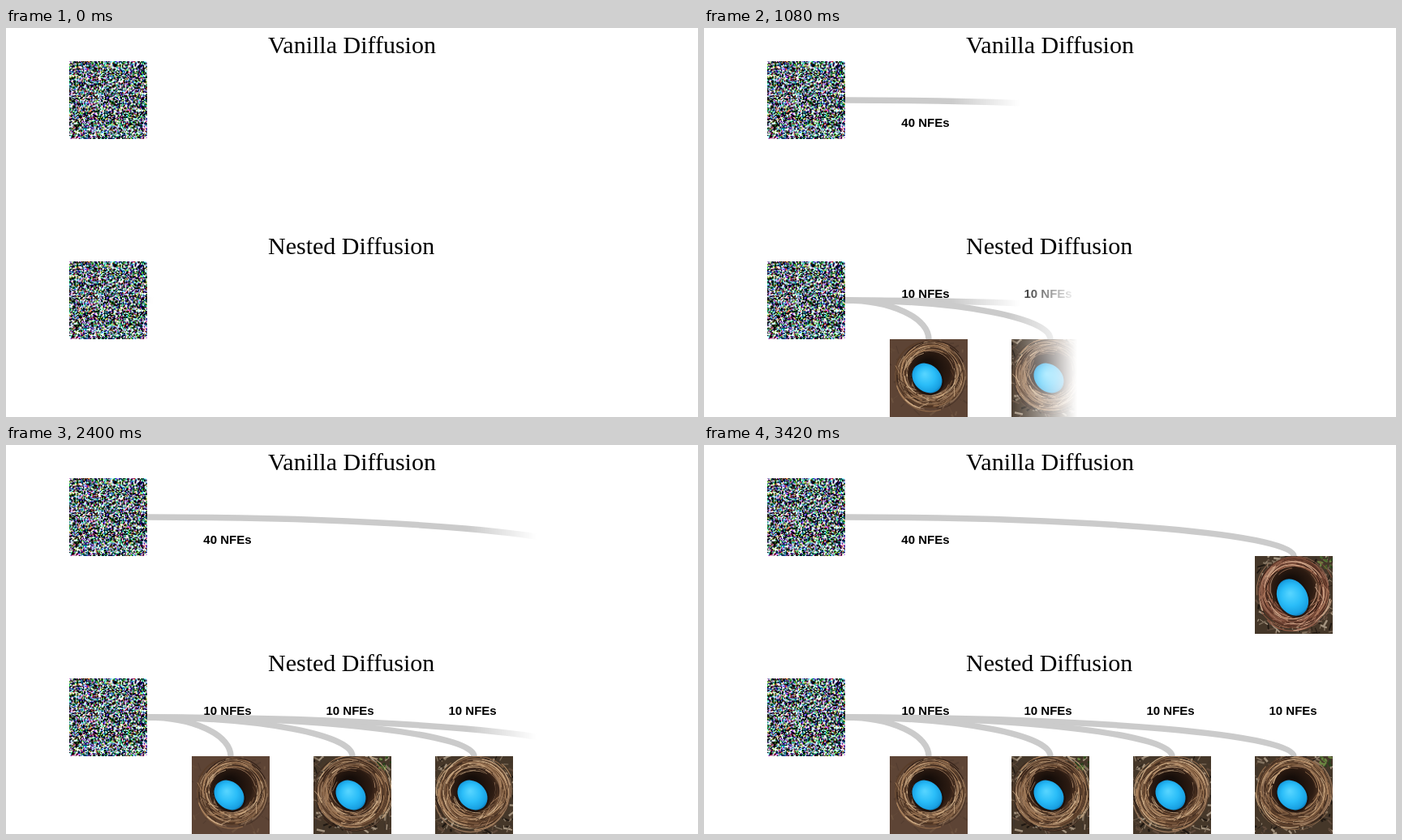
Write an HTML page with a canvas that moves like this. It is 853 by 480 pixels and loops after 7770 ms.

```html
<!DOCTYPE html>
<html lang="en">
<head>
<meta charset="utf-8">
<title>Vanilla and Nested Diffusion</title>
<style>
  @property --t {
    syntax: "<number>";
    inherits: true;
    initial-value: 0;
  }
  html, body {
    margin: 0;
    width: 100%;
    height: 100%;
    overflow: hidden;
    background: #fff;
  }
  /* --t is the elapsed time in ms, advancing every 60 ms */
  #stage {
    position: relative;
    width: 853px;
    height: 480px;
    overflow: hidden;
    animation: clock 7770ms -1ms infinite;
  }
  @keyframes clock {
    0% { --t: 0; animation-timing-function: steps(57, end); }
    44.0154%, 100% { --t: 3420; }
  }
  .layer, svg {
    position: absolute;
    left: 0;
    top: 0;
    width: 853px;
    height: 480px;
  }
  canvas { position: absolute; width: 96px; height: 96px; }
  /* soft left-to-right wipe from x = 174: --begin in ms, --speed in px per ms */
  .wipe {
    --edge: calc((174 + (var(--t) - var(--begin)) * var(--speed)) * 1px);
    --fade: linear-gradient(to right, #000 calc(var(--edge) - 85px), transparent var(--edge));
    -webkit-mask-image: var(--fade);
    mask-image: var(--fade);
  }
  path { fill: none; stroke: #cbcbcb; stroke-width: 7.4; }
  .title { font: 30px "Liberation Serif", "Times New Roman", serif; }
  .label { font: bold 15px "Liberation Sans", Arial, sans-serif; }
</style>
</head>
<body>
<div id="stage">
  <div class="layer" id="base">
    <svg>
      <text class="title" x="323" y="31">Vanilla Diffusion</text>
      <text class="title" x="323" y="279">Nested Diffusion</text>
    </svg>
  </div>
</div>
<script>
  const stage = document.getElementById("stage");
  const base = document.getElementById("base");

  function random(seed) {
    return () => {
      seed = (seed + 0x6d2b79f5) | 0;
      let r = Math.imul(seed ^ (seed >>> 15), 1 | seed);
      r = (r + Math.imul(r ^ (r >>> 7), 61 | r)) ^ r;
      return ((r ^ (r >>> 14)) >>> 0) / 4294967296;
    };
  }

  function addCanvas(parent, x, y) {
    const c = document.createElement("canvas");
    c.width = c.height = 96;
    c.style.left = x + "px";
    c.style.top = y + "px";
    parent.append(c);
    return c.getContext("2d");
  }

  function addLayer(begin, speed, svg) {
    const d = document.createElement("div");
    d.className = "layer wipe";
    d.style.setProperty("--begin", begin);
    d.style.setProperty("--speed", speed);
    d.innerHTML = `<svg>${svg}</svg>`;
    stage.append(d);
    return d;
  }

  const label = (x, y, text) => `<text class="label" x="${x}" y="${y}">${text}</text>`;

  // Quarter ellipse from the noise square down to the top of a result
  const curve = (y, endX) => `<path d="M174 ${y}A${endX - 174} 48 0 0 1 ${endX} ${y + 48}"/>`;

  function drawNoise(ctx, seed) {
    const rnd = random(seed), n = 74;
    const small = document.createElement("canvas");
    small.width = small.height = n;
    const sctx = small.getContext("2d");
    const img = sctx.createImageData(n, n);
    const bell = () => rnd() + rnd() + rnd() - 1.5;
    for (let i = 0; i < img.data.length; i += 4) {
      const common = bell() * 150;
      img.data[i] = 110 + common + bell() * 75;
      img.data[i + 1] = 121 + common + bell() * 75;
      img.data[i + 2] = 125 + common + bell() * 75;
      img.data[i + 3] = 255;
    }
    sctx.putImageData(img, 0, 0);
    ctx.filter = "contrast(1.7)";
    ctx.drawImage(small, 0, 0, 96, 96);
  }

  function oval(ctx, x, y, rx, ry, turn = 0) {
    ctx.beginPath();
    ctx.ellipse(x, y, rx, ry, turn, 0, 2 * Math.PI);
  }

  function drawNest(ctx, o) {
    const rnd = random(o.seed);
    const spread = s => (rnd() - 0.5) * 2 * s;
    const pick = list => list[Math.floor(rnd() * list.length)];
    ctx.fillStyle = o.ground;
    ctx.fillRect(0, 0, 96, 96);

    // Leaf litter
    for (let i = 0; i < o.litter; i++) {
      const x = rnd() * 96, y = rnd() * 96, a = rnd() * 6.3, l = 3 + rnd() * 8;
      ctx.strokeStyle = pick(o.litterTones);
      ctx.lineWidth = 0.7 + rnd() * 2;
      ctx.beginPath();
      ctx.moveTo(x, y);
      ctx.lineTo(x + l * Math.cos(a), y + l * Math.sin(a));
      ctx.stroke();
    }
    if (o.green) {
      for (let i = 0; i < 16; i++) {
        ctx.fillStyle = pick(["#47652b", "#6b8442", "#2c401e"]);
        oval(ctx, 80 + rnd() * 16, rnd() * 15, 1 + rnd() * 3, 1.3, rnd() * 3);
        ctx.fill();
      }
    }

    // Bowl, dark hollow and woven rim
    ctx.fillStyle = o.tones[2];
    oval(ctx, o.x, 45, o.r - 2, o.r - 3);
    ctx.fill();
    const hollow = ctx.createRadialGradient(o.x - 4, 34, 8, o.x, 42, 34);
    hollow.addColorStop(0, "#150d09");
    hollow.addColorStop(0.65, "#2c1b12");
    hollow.addColorStop(1, "#5a3c28");
    ctx.fillStyle = hollow;
    oval(ctx, o.x, 42, 33, 30);
    ctx.fill();
    for (let i = 0; i < 150; i++) {
      const k = rnd(), r = 30 + k * (o.r - 29), from = rnd() * 6.3;
      ctx.strokeStyle = pick(o.tones);
      ctx.lineWidth = 0.5 + rnd() * 0.9;
      ctx.beginPath();
      ctx.ellipse(o.x + spread(o.loose), 42 + k * 3 + spread(o.loose), r, r * (0.88 + rnd() * 0.14),
        spread(0.9), from, from + 0.4 + rnd() * 1.2);
      ctx.stroke();
    }
    for (let i = 0; i < 40; i++) {
      const a = -0.3 + rnd() * 3.7, r = 25 + rnd() * 15, turn = a + 1 + rnd() * 1.3;
      const x = o.x + r * Math.cos(a), y = 44 + r * Math.sin(a);
      ctx.strokeStyle = pick(o.tones);
      ctx.lineWidth = 0.8;
      ctx.beginPath();
      ctx.moveTo(x, y);
      ctx.lineTo(x + 13 * Math.cos(turn), y + 13 * Math.sin(turn));
      ctx.stroke();
    }

    // Egg
    const [ex, ey, rx, ry, tilt] = o.egg;
    ctx.fillStyle = "#1a100acc";
    oval(ctx, ex + 0.5, ey + 1, rx + 2, ry + 1.5, tilt);
    ctx.fill();
    const shell = ctx.createRadialGradient(ex - 3, ey - 5, 1, ex, ey, ry + 1);
    shell.addColorStop(0, "#55d4ff");
    shell.addColorStop(0.5, "#2abdf8");
    shell.addColorStop(0.85, "#18a0e2");
    shell.addColorStop(1, "#0c70aa");
    ctx.fillStyle = shell;
    oval(ctx, ex, ey, rx, ry, tilt);
    ctx.fill();
  }

  const straw = ["#8a6547", "#ad8560", "#5a3e2a", "#cfae88", "#37241a", "#96755a"];
  const rust = ["#8a5540", "#b07d60", "#5a3426", "#d3a98c", "#321c14", "#976652"];
  const litterTones = ["#1f1812", "#82725f", "#40352b", "#a3937f", "#5f4a3b"];
  const plain = {
    ground: "#5d4435", litter: 90, litterTones: ["#624938", "#533d30", "#6c523f"],
    tones: straw, x: 50.5, r: 43, loose: 2, egg: [46, 48, 16.5, 20.3, -0.8]
  };
  const busy = { ...plain, ground: "#453729", litter: 260, litterTones, x: 48.5, r: 46, loose: 4 };

  drawNoise(addCanvas(base, 78, 41), 11);
  drawNoise(addCanvas(base, 78, 288), 11);

  const vanilla = addLayer(0, 0.2, label(243.3, 122, "40 NFEs") + curve(89, 727));
  drawNest(addCanvas(vanilla, 679, 137),
    { ...busy, seed: 9, tones: rust, green: true, x: 48, egg: [46.5, 51, 18.3, 23.8, -0.5] });

  addLayer(0, 0.2, curve(336, 727));

  // Each nested result is wiped in over one second
  [-33, 339, 1193, 1996].forEach((begin, i) => {
    const branch = i < 3 ? curve(336, 277 + 150 * i) : "";
    const layer = addLayer(begin, 0.236 + 0.15 * i, label(243.5 + 151 * i, 333, "10 NFEs") + branch);
    drawNest(addCanvas(layer, 229 + 150 * i, 384),
      { ...(i ? busy : plain), seed: 21 + i, green: i === 1 || i === 3 });
  });
</script>
</body>
</html>
```
